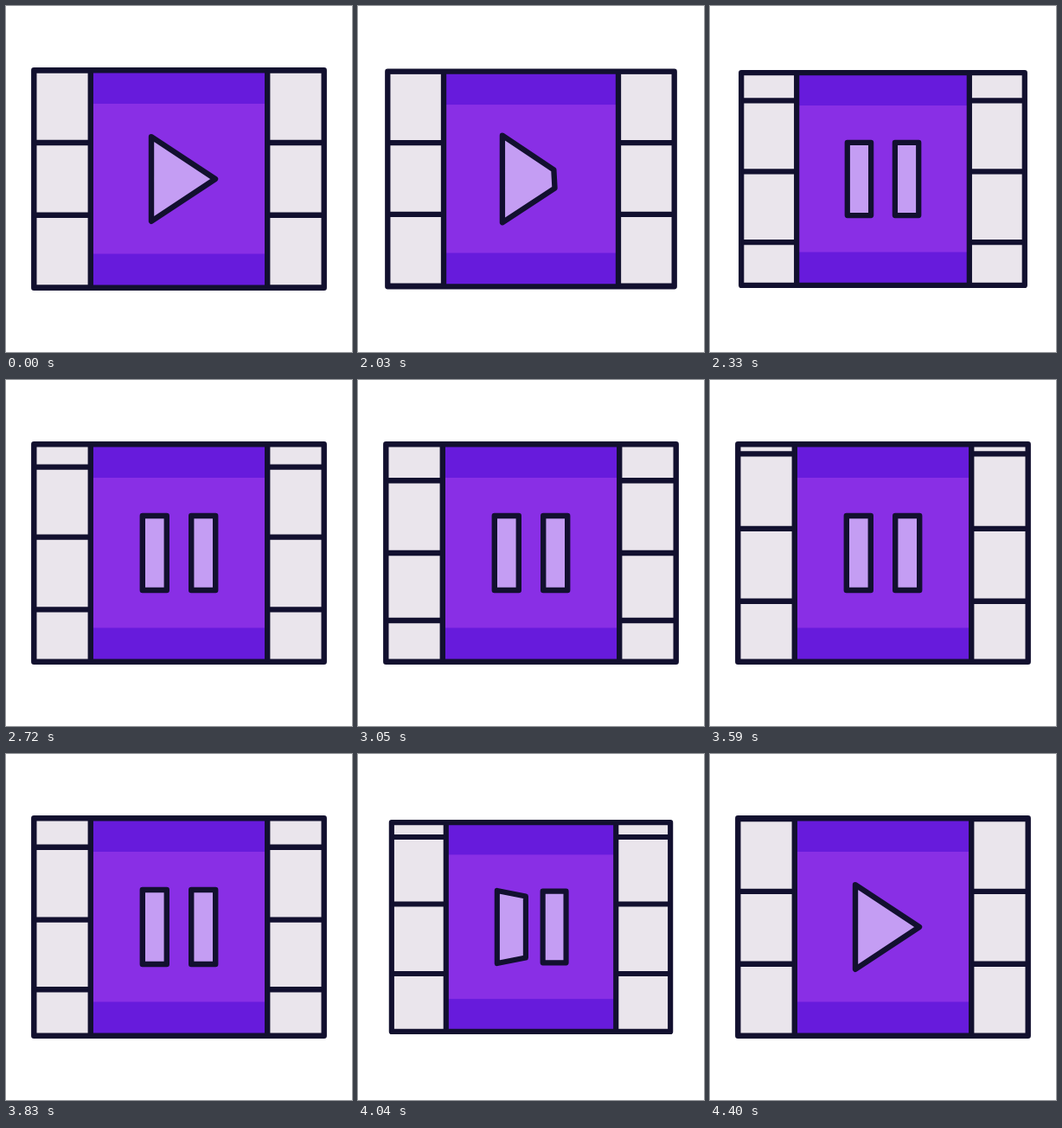
An HTML page with a canvas that plays this animation: 400x400 px, repeating every 4430 ms.

```html
<!DOCTYPE html>
<html lang="en">
<head>
<meta charset="utf-8">
<title>Film player</title>
<style>
  html, body { margin: 0; width: 100%; height: 100%; overflow: hidden; background: #fff; }
  canvas { display: block; width: 400px; height: 400px; }
</style>
</head>
<body>
<canvas id="stage" width="400" height="400"></canvas>
<script>
const ctx = document.getElementById('stage').getContext('2d');

const LOOP = 4430, HOLD = 2000, STEP = 30;
const INK = '#12102f', PAPER = '#eae5ec', PURPLE = '#892fe5', BAND = '#671bdc', LILAC = '#c49df3';
const LEFT = 32.3, RIGHT = 367.7, TOP = 74.2, BOTTOM = 325.8;
const INNER_LEFT = 97.8, INNER_RIGHT = 302.2;

// Strip travel: step, distance, speed
const TRAVEL = [
  [0, 0, 0], [24, 225, 17.5], [35, 458, 22.5], [53, 902, 20.2],
  [68, 1149.7, 11.8], [80, 1247, 1.5], [81, 1248, 0]
];
const DISTANCE = 1248;

// The strip is joined from pieces, so some cells differ in height
const SEAMS = { 2: -3.2, 5: 2.7, 9: -5.8, 13: -2.8 };
const stripLines = [];
for (let i = -2, y = 325.5; i < 19; i++) {
  if (i > -2) y -= 83.8 + (SEAMS[i] || 0);
  stripLines.push(y);
}

const clamp = x => Math.min(1, Math.max(0, x));
const lerp = (a, b, p) => a + (b - a) * p;
const smooth = x => x * x * (3 - 2 * x);

function travel(n) {
  const i = Math.max(1, TRAVEL.findIndex(k => n <= k[0]));
  const [t0, y0, v0] = TRAVEL[i - 1], [t1, y1, v1] = TRAVEL[i];
  const d = t1 - t0, x = (n - t0) / d, s = smooth(x);
  return lerp(y0, y1, s) + d * (v0 * x * (1 - x) ** 2 - v1 * x * x * (1 - x));
}

const pulse = (n, start) => Math.sin(Math.PI * clamp((n - start) / 13));
const pressScale = n => 1 - 0.05 * (pulse(n, 0) + pulse(n, 64.3));

// 0 is the play triangle, 1 is the pause bars
function pauseAmount(n) {
  return n < 40 ? 1 - (1 - clamp(n / 7.4)) ** 2 : 1 - smooth(clamp((n - 66) / 8.5));
}

function fillRect(color, x0, y0, x1, y1) {
  ctx.fillStyle = color;
  ctx.fillRect(x0, y0, x1 - x0, y1 - y0);
}

function line(x0, y0, x1, y1) {
  ctx.beginPath();
  ctx.moveTo(x0, y0);
  ctx.lineTo(x1, y1);
  ctx.stroke();
}

function polygon(points) {
  ctx.beginPath();
  points.forEach(p => ctx.lineTo(...p));
  ctx.closePath();
  ctx.fillStyle = LILAC;
  ctx.fill();
  ctx.stroke();
}

function drawStrip(n) {
  const rest = DISTANCE - travel(n);
  ctx.save();
  ctx.beginPath();
  ctx.rect(LEFT, TOP, RIGHT - LEFT, BOTTOM - TOP);
  ctx.clip();
  for (const y of stripLines) {
    const at = y + rest;
    if (at < TOP - 4 || at > BOTTOM + 4) continue;
    line(LEFT, at, INNER_LEFT, at);
    line(INNER_RIGHT, at, RIGHT, at);
  }
  ctx.restore();
}

function drawIcon(n) {
  const m = pauseAmount(n);
  const grow = clamp((m - 0.4) / 0.4);
  if (grow > 0) {
    const w = 14 * grow, h = 43 * grow;
    polygon([[228.2 - w, 200 - h], [228.2 + w, 200 - h], [228.2 + w, 200 + h], [228.2 - w, 200 + h]]);
  }
  const bulge = n < 40 ? 5 * Math.sin(Math.PI * m) : 0;
  const x0 = lerp(168, 157.8, m) + bulge * 0.3;
  const x1 = lerp(242, 185.8, m);
  const h0 = lerp(48.8, 43, m) + bulge;
  const h1 = lerp(0, 43, m);
  polygon([[x0, 200 - h0], [x1 - bulge * 0.33, 200 - h1], [x1, 200 + h1], [x0, 200 + h0]]);
}

function draw(n) {
  fillRect('#fff', 0, 0, 400, 400);
  ctx.save();
  const s = pressScale(n);
  ctx.translate(200, 200);
  ctx.scale(s, s);
  ctx.translate(-200, -200);
  ctx.strokeStyle = INK;
  ctx.lineWidth = 6.4;
  ctx.lineJoin = 'round';

  fillRect(PAPER, LEFT, TOP, RIGHT, BOTTOM);
  drawStrip(n);
  fillRect(BAND, INNER_LEFT, TOP, INNER_RIGHT, BOTTOM);
  fillRect(PURPLE, INNER_LEFT, 113, INNER_RIGHT, 286.5);
  line(INNER_LEFT, TOP, INNER_LEFT, BOTTOM);
  line(INNER_RIGHT, TOP, INNER_RIGHT, BOTTOM);
  ctx.strokeRect(LEFT, TOP, RIGHT - LEFT, BOTTOM - TOP);
  drawIcon(n);
  ctx.restore();
}

const start = performance.now();
function tick() {
  const t = (performance.now() - start) % LOOP;
  draw(Math.max(0, Math.floor((t - HOLD) / STEP)));
  requestAnimationFrame(tick);
}
tick();
</script>
</body>
</html>
```
